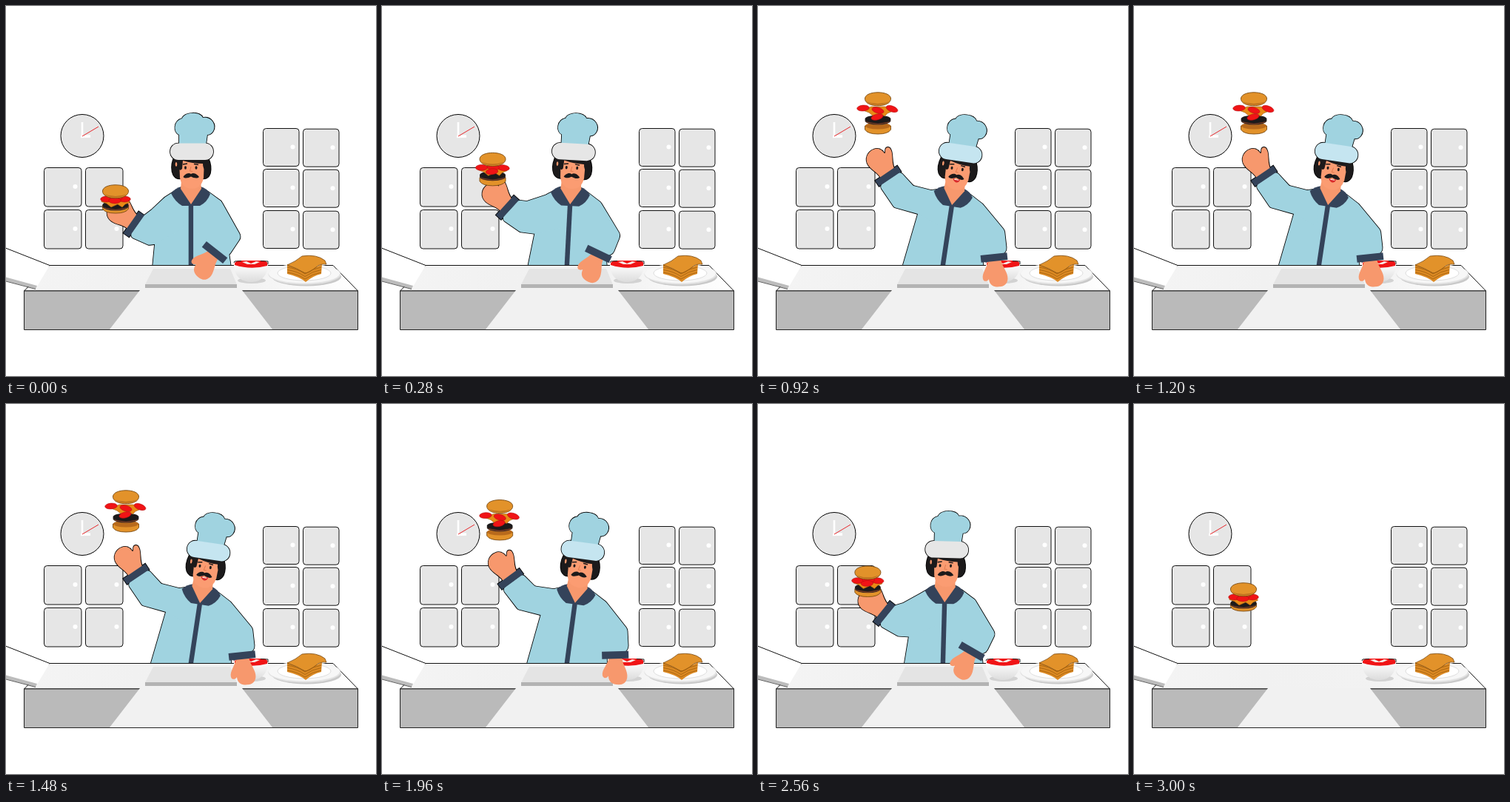
These frames come from a looping animation (500x500 px, 3.04 s). An HTML page with a canvas:

```html
<!DOCTYPE html>
<html lang="en">
<head>
<meta charset="utf-8">
<title>Chef tossing a burger</title>
<style>
html, body { margin: 0; width: 100%; height: 100%; overflow: hidden; background: #fff; }
canvas { display: block; width: 100vw; height: 100vh; }
</style>
</head>
<body>
<canvas id="stage" width="500" height="500"></canvas>
<script>
const c = document.getElementById('stage').getContext('2d');
const LOOP = 3040, STEP = 40;
const BLUE = '#a0d3e0', NAVY = '#34435a', SKIN = '#f7986d', HAIR = '#1c1a1b';
const GREY = '#e6e6e6', BUN = '#e2922a', RED = '#f01416', CRUST = '#7a4a12';
const TAU = Math.PI * 2, rad = d => d * Math.PI / 180;

const clamp = x => Math.max(0, Math.min(1, x));
const ease = x => { x = clamp(x); return x * x * (3 - 2 * x); };
const mix = (a, b, k) => a + (b - a) * k;
const bow = k => k * (1 - k);

// Fills the current path, with an optional edge.
function paint(fill, edge, width = 1) {
  if (fill) { c.fillStyle = fill; c.fill(); }
  if (edge) { c.strokeStyle = edge; c.lineWidth = width; c.stroke(); }
}
// Polygon with rounded corners.
function poly(pts, fill, edge, r = 0, width = 1) {
  const last = pts[pts.length - 1];
  c.beginPath();
  c.moveTo((last[0] + pts[0][0]) / 2, (last[1] + pts[0][1]) / 2);
  pts.forEach((p, i) => {
    const n = pts[(i + 1) % pts.length];
    c.arcTo(p[0], p[1], (p[0] + n[0]) / 2, (p[1] + n[1]) / 2, r);
  });
  c.closePath();
  paint(fill, edge, width);
}
function oval(x, y, rx, ry, fill, edge, turn = 0, width = 1) {
  c.beginPath();
  c.ellipse(x, y, rx, ry, rad(turn), 0, TAU);
  paint(fill, edge, width);
}
function box(x, y, w, h, r, fill, edge, width = 1) {
  c.beginPath();
  c.roundRect(x, y, w, h, r);
  paint(fill, edge, width);
}
function line(pts, color, width = 1) {
  c.beginPath();
  pts.forEach(p => c.lineTo(p[0], p[1]));
  paint(null, color, width);
}
function shape(d, fill, edge, width = 1) {
  const p = new Path2D(d);
  if (fill) { c.fillStyle = fill; c.fill(p); }
  if (edge) { c.strokeStyle = edge; c.lineWidth = width; c.stroke(p); }
}
function at(x, y, turn, draw) {
  c.save();
  c.translate(x, y);
  c.rotate(rad(turn));
  draw();
  c.restore();
}
function fade(x0, y0, x1, y1, ...stops) {
  const g = c.createLinearGradient(x0, y0, x1, y1);
  stops.forEach((s, i) => g.addColorStop(i / (stops.length - 1), s));
  return g;
}

function wall() {
  oval(103, 175.5, 29, 29, GREY, '#000');
  line([[103, 157], [103, 177]], '#fff', 2.6);
  line([[101, 176.5], [114, 176]], '#fff', 3.4);
  line([[103, 176], [125, 163]], '#e8282c');
  for (const x of [51.5, 107.5]) for (const y of [218.5, 275.5]) {
    box(x, y, 50.5, 52.5, 4, GREY, '#111');
    oval(x + 42, y + 25.5, 3, 3, '#fff');
  }
  for (const x of [347.5, 401.5]) for (const y of [165.5, 220.5, 276.5]) {
    const top = y + (x > 400 ? 0.7 : 0);
    box(x, top, 48.5, 51, 4, GREY, '#111');
    oval(x + 40, top + 25, 3, 3, '#fff');
  }
}

function counter() {
  poly([[59, 350.5], [442, 350.5], [475.5, 385], [24.5, 385]],
    fade(24, 0, 476, 0, '#f4f4f4', '#f1f1f1', '#f2f2f2', '#ffffff'), '#111');
  box(24.5, 385, 451, 52.5, 0, '#bababa', '#222');
  poly([[181, 384], [319, 384], [360, 437], [140, 437]], '#f1f1f1');
  line([[140, 437.5], [360, 437.5]], '#222');
  poly([[-2, 327], [59, 350.5], [42, 379], [-2, 366]], '#fff');
  poly([[-2, 366], [42, 378], [40, 382], [-2, 371]], '#bcbcbc');
  line([[-2, 326.5], [59, 350.5]], '#111');
  line([[-2, 371.5], [40, 382.5]], '#333', 0.8);
}

function board() {
  poly([[199, 355], [303, 355], [312, 376.5], [188, 376.5]], '#e4e4e4');
  box(188, 376, 124, 5, 0, '#b3b3b3');
}

function dishes() {
  oval(332, 371, 19, 4, '#d2d2d2');
  shape('M308 349 Q331 342 354 349 C354 364 345 373 331 373 S308 364 308 349Z',
    fade(0, 348, 0, 374, '#ffffff', '#ededed', '#dadada'));
  shape('M309 350 Q308 345 315 344 L348 344 Q355 345 353 351 Q331 357 309 350Z', RED);
  shape('M319 346 L325 345 L331 348 L338 345 L343 346 L336 349 L326 349Z', '#f6e6e2');
  line([[308, 347], [309, 345], [318, 344.5]], '#222');
  line([[344, 344.5], [354, 345], [354, 349]], '#222');

  oval(406, 366, 47, 12.5, '#c9c9c9');
  oval(403.5, 362.5, 49, 14, '#e2e2e2');
  oval(403, 361.5, 48, 13, '#f7f7f7');
  oval(403, 361, 36, 10, '#ffffff', '#dedede');
  shape('M380 349 L404 360 L427 349 L426 362 Q414 365 405 373 Q397 366 380 362Z', '#dc8a24');
  shape('M380 350 Q392 345 400 338 Q420 335 431 344 L433 349 Q424 348 419 353 Q409 361 404 361 Q393 354 380 350Z',
    BUN, CRUST, 0.8);
  for (const y of [353, 356.5, 360])
    shape(`M380 ${y} Q394 ${y + 2} 404 ${y + 9} Q414 ${y + 2} 426 ${y}`, null, '#a8640f', 0.9);
}

// Chef from the hips up; "edge" draws only the outline behind the figure.
function chef(p, q, smile, edge) {
  const skin = edge ? null : SKIN, cloth = edge ? null : BLUE;
  const ink = edge ? '#000' : null, w = 1.7;
  const lean = rad(8.5 * p);
  const turned = (x, y) => [
    250 + (x - 250) * Math.cos(lean) - (y - 350) * Math.sin(lean),
    350 + (x - 250) * Math.sin(lean) + (y - 350) * Math.cos(lean)];
  const cuff = [mix(173, 176, p) - 19 * bow(p), mix(295, 230, p)];
  const tilt = -55 + 21 * p;
  const onCuff = (x, y, o = cuff, a = rad(tilt)) => [
    o[0] + x * Math.cos(a) - y * Math.sin(a),
    o[1] + x * Math.sin(a) + y * Math.cos(a)];
  const wrist = rightCuff(q);
  const onWrist = (x, y) => onCuff(x, y, wrist, rad(wrist[2]));
  const armpit = [mix(201, 216, p), mix(322, 281, p)];
  const shoulderL = [mix(214, 234, p), mix(259, 249, p)];
  const shoulderR = [mix(291, 304, p), mix(264, 268, p)];

  at(...cuff, tilt, () => shape(
    'M-10 0 C-8 -12 -14 -18 -14 -27 C-14 -38 -4 -43 4 -41 C10 -40 13 -35 13 -29 ' +
    'C14 -27 15 -30 17 -32 C20 -35 24 -32 23 -28 C22 -19 13 -14 12 0Z', skin, ink, w));
  poly([[mix(198, 195, p), 353], armpit, shoulderL, turned(228, 250), turned(272, 250),
    shoulderR, [304, 353]], cloth, ink, 3, w);
  poly([armpit, [mix(193, 184, p) - 15 * bow(p), mix(323, 272, p)], onCuff(-17, 4), onCuff(17, 4),
    [mix(197, 210, p) - 25 * bow(p), mix(275, 243, p)], shoulderL, turned(235, 254),
    turned(240, 300)], cloth, ink, 5, w);
  poly([turned(270, 252), shoulderR, [mix(318, 333, q), mix(312, 303, q)], onWrist(18, -3),
    onWrist(-18, -3), turned(255, 300)], cloth, ink, 9, w);
  at(...cuff, tilt, () => box(-18, -5, 36, 9.5, 0, edge ? null : NAVY, ink, w));

  at(250, 350, 8.5 * p, () => {
    c.translate(-250, -350);
    shape('M234 207 H226 Q222 219 226 228 Q230 235 238 233 L264 233 Q273 235 276 226 Q278 216 274 207Z',
      edge ? null : HAIR, ink, w);
    shape('M234 188 L234 174 C226 171 226 155 238 152 C241 143 262 142 266 151 ' +
      'C277 149 285 160 280 169 Q277 174 272 174 L270 188Z', cloth, ink, w);
    if (!edge) {
      box(246.7, 264, 6.4, 90, 0, NAVY);
      shape('M223 253 Q229 246 237 244 L263 244 Q271 246 276 254 Q272 265 262 270 L238 270 Q228 264 223 253Z', NAVY);
      shape('M237 236 L236 247 L250 268 L264 247 L263 236Z', SKIN);
      shape('M234 206 H268 L267 232 Q264 247 251 247 Q237 246 235 232Z', '#fb9c72');
      shape('M233 205 H270 V222 Q266 220 266 213 Q252 213 239 209 L238 220 Q235 224 233 219Z', HAIR);
      oval(230, 214, 1.3, 3, SKIN);
      line([[239, 214], [245, 213]], HAIR, 1.5);
      line([[254, 213.5], [260, 214.5]], HAIR, 1.5);
      oval(242.5, 218.5, 1.5, 2.2, HAIR);
      oval(257, 218.5, 1.5, 2.2, HAIR);
      line([[250, 217], [248.5, 223], [252, 223.5]], '#e27b50');
      shape('M250 227 C246 224 241 228 239.500 231 C242 234 247 232 250 230.500 C253 232 258 234 261 231 C259 228 254 224 250 227Z', HAIR);
      if (smile) {
        shape('M246 232 Q251 233.500 256 232 Q255 237 251 237 Q247 236 246 232Z', '#d92b2b');
        line([[248, 233.3], [254, 233.3]], '#fff');
      }
    }
    box(222, 185.5, 58, 22.5, 11, edge ? null : p > 0.7 ? '#c5e5f0' : GREY, ink, w);
  });
}

function rightCuff(q) {
  return [mix(282, 319, q), mix(333, 340, q), 38 - 44 * q];
}

function rightHand(q) {
  at(...rightCuff(q), () => {
    shape('M-8 2 C-10 12 -19 19 -18 27 C-17 32 -12 31 -10 28 C-10 36 -5 40 4 40 ' +
      'C13 40 17 33 15 24 C13 15 9 12 9 2Z', SKIN);
    box(-18, -5, 36, 10, 0, NAVY);
  });
}

function burger(p) {
  const x = 148 + 14 * p ** 2.1;
  const y = (a, b) => mix(a, b, p);
  const base = y(272, 165);
  shape(`M${x - 17.5} ${base - 3} Q${x} ${base - 11} ${x + 17.5} ${base - 3} V${base + 2} ` +
    `Q${x + 14} ${base + 8} ${x} ${base + 8} T${x - 17.5} ${base + 2}Z`, BUN, CRUST, 0.9);
  oval(x, base - 3, 17, 4.5, '#b86a1c');

  const meat = y(269, 153);
  oval(x, meat + 2, 17.5, 5.5, '#3a2a25');
  oval(x, meat, 17.5, 5.5, HAIR);
  line([[x - 15, meat + 4], [x, meat + 6.5], [x + 15, meat + 4]], '#7b3b22', 1.2);

  const cheese = y(264, 141);
  poly([[x - 20, cheese], [x - 9, cheese - 5], [x + 10, cheese - 5], [x + 20, cheese + 1],
    [x + 13, cheese + 4], [x + 9, cheese + 8], [x + 3, cheese + 4], [x - 6, cheese + 8],
    [x - 12, cheese + 3]], '#e98a16', '#9a5a12', 0.5, 0.6);

  const slices = [
    [-12, -20, 261, 138, -4], [12, 19, 261, 139, 20], [1, 0, 259, 141, 16], [-1, -1, 263, 150, -14]];
  for (const [x0, x1, y0, y1, turn] of slices)
    oval(x + mix(x0, x1, p), y(y0, y1), 8.3, 3.9, RED, '#b40f12', turn * p, 0.6);

  const top = y(250, 125);
  shape(`M${x - 17.5} ${top} C${x - 17} ${top - 11} ${x + 17} ${top - 11} ${x + 17.5} ${top} ` +
    `C${x + 18} ${top + 13} ${x - 18} ${top + 13} ${x - 17.5} ${top}Z`, BUN, CRUST, 0.9);
  shape(`M${x - 16} ${top + 4} Q${x} ${top + 10} ${x + 16} ${top + 4} Q${x} ${top + 13} ${x - 16} ${top + 4}Z`, '#b9701f');
}

function draw(now) {
  const t = Math.floor(now % LOOP / STEP) * STEP;
  const fall = ease((t - 1735) / 1134);
  const toss = ease(t / 706) - fall;
  const arm = ease(t / 800) - fall;
  const present = t < 3000;

  c.fillStyle = '#fff';
  c.fillRect(0, 0, 500, 500);
  wall();
  if (present) {
    const smile = t >= 400 && t < 1900;
    chef(toss, arm, smile, true);
    chef(toss, arm, smile, false);
  }
  burger(toss);
  counter();
  if (present) board();
  dishes();
  if (present) rightHand(arm);
}

const start = performance.now();
function tick() {
  draw(performance.now() - start);
  requestAnimationFrame(tick);
}
tick();
</script>
</body>
</html>
```
